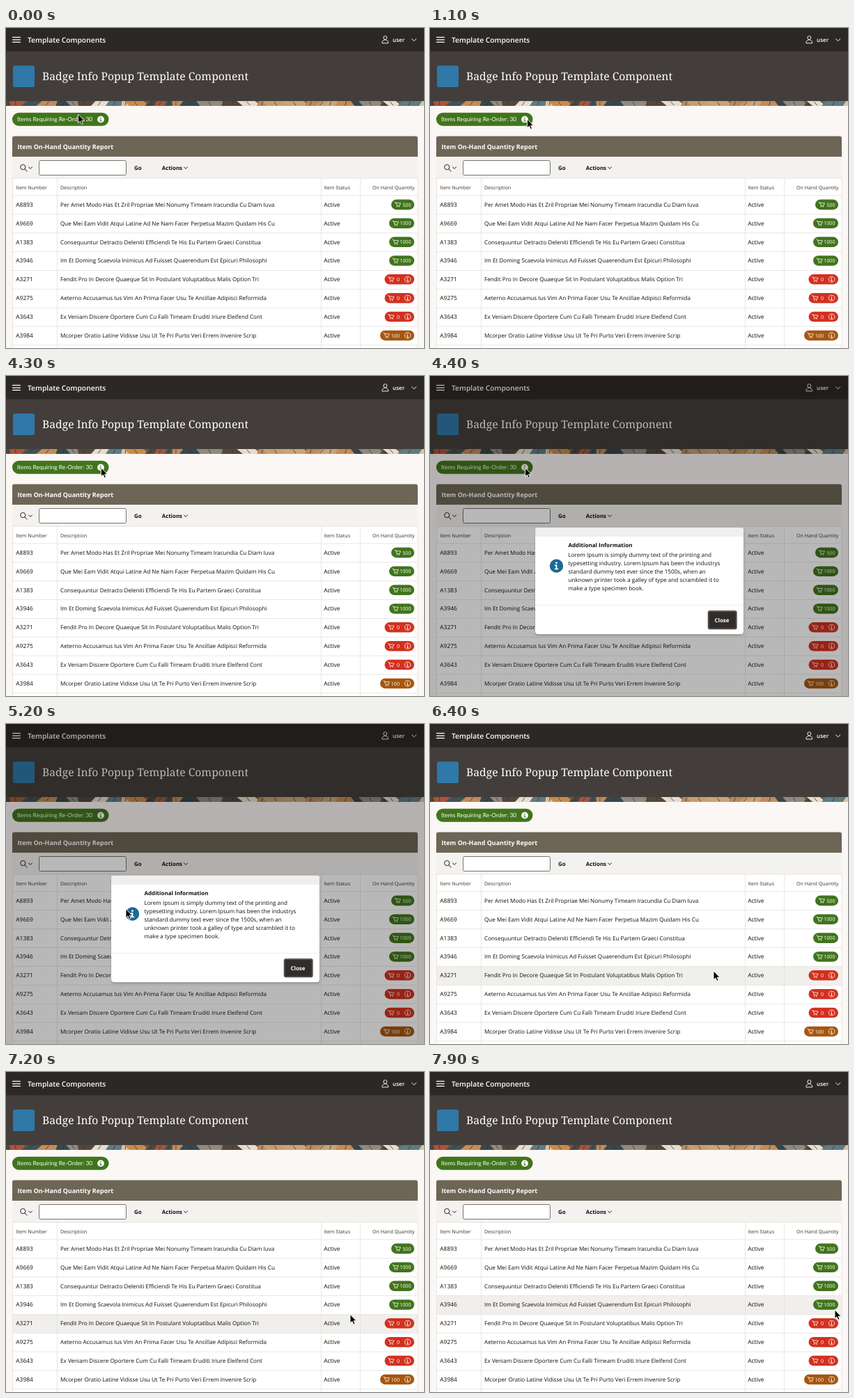
An HTML page for the animation above (8000 ms loop, 600 by 460 pixels).

```html
<!DOCTYPE html>
<html lang="en">
<head>
<meta charset="utf-8">
<title>Badge Info Popup</title>
<style>
  html, body { margin: 0; width: 600px; height: 460px; overflow: hidden; }
  svg { display: block; }
  text { font-family: "Open Sans", "Noto Sans", sans-serif; text-rendering: geometricPrecision; white-space: pre; }
  .title { font-family: "Noto Serif", serif; }
  .pill { font-family: Lato, sans-serif; }
</style>
</head>
<body>
<svg id="stage" width="600" height="460" viewBox="0 0 600 460"></svg>
<script>
const WHITE = '#fff', INK = '#100f0e', GREEN = '#41741c', RED = '#d2311f', AMBER = '#a6560e';
const ROW_TOP = 241, ROW_H = 26.87;

const rect = (x, y, w, h, fill, r = 0, extra = '') =>
  `<rect x="${x}" y="${y}" width="${w}" height="${h}" rx="${r}" fill="${fill}" ${extra}/>`;
const text = (x, y, s, fill = INK, size = 8.14, extra = '') =>
  `<text x="${x}" y="${y}" fill="${fill}" font-size="${size}" ${extra}>${s}</text>`;
const bold = (x, y, s, fill = INK, size = 7.9, weight = 700) =>
  text(x, y, s, fill, size, `font-weight="${weight}"`);
const line = (d, color, width = 1) =>
  `<path d="${d}" fill="none" stroke="${color}" stroke-width="${width}" stroke-linecap="round" stroke-linejoin="round"/>`;
const circle = (x, y, r, fill, extra = '') => `<circle cx="${x}" cy="${y}" r="${r}" fill="${fill}" ${extra}/>`;
const chevron = (x, y, w, color) => line(`M${x} ${y}l${w / 2} ${w / 2}l${w / 2} ${-w / 2}`, color, 0.95);

// Letter "i" drawn inside an info circle
const infoMark = (x, y, k, color) =>
  circle(x, y - 2.3 * k, 0.75 * k, color) +
  line(`M${x - 0.9 * k} ${y - 0.4 * k}h${0.9 * k}v${2.7 * k}m${-k} 0h${2 * k}`, color, 0.95 * k);

const cart = (x, y) =>
  line(`M${x} ${y - 3.4}h1.4l1.6 4.8h4l1.4 -3.6h-6.5`, WHITE, 0.75) +
  circle(x + 3.3, y + 3, 0.75, WHITE) + circle(x + 6.4, y + 3, 0.75, WHITE);

function quantity(y, value) {
  const warn = value <= 100;
  const color = value === 0 ? RED : warn ? AMBER : GREEN;
  const left = { 0: 543.5, 100: 537, 500: 553, 1000: 550 }[value];
  return rect(left, y - 7.3, 586 - left, 14.6, color, 7.3) + cart(left + 5, y) +
    text(warn ? 565 : 581.5, y + 2.7, value, WHITE, 7.2, 'text-anchor="end"') +
    (warn ? circle(576.5, y, 4.2, 'none', 'stroke="#fff" stroke-width=".8"') + infoMark(576.5, y, 0.9, WHITE) : '');
}

function bannerStrip() {
  const colors = ['#4b4843', '#5e7c84', '#8f8a80', '#3d5358', '#c98a4a', '#e6dccb', '#35484c', '#a9543a', '#d9c3a2', '#56473d', '#c58b55'];
  const rnd = i => Math.abs(Math.sin(i * 127.1 + 3) * 43758.5) % 1;
  let out = rect(0, 105, 600, 7, '#6a5c50');
  for (let x = -8, i = 0; x < 600; i++) {
    const w = 10 + rnd(i) * 22, slant = 10 - rnd(i + 50) * 20;
    const color = x > 345 && x < 470 ? ['#c9a379', '#b98a5c', '#c79d70'][i % 3] : colors[i * 7 % colors.length];
    out += `<path d="M${x} 112l${slant} -7h${w + 6}l${-slant} 7z" fill="${color}"/>`;
    out += line(`M${x + w / 2} 111l${slant / 2} -5`, '#2f3435', 0.8);
    x += w;
  }
  return out;
}

const rows = [
  ['A8893', 'Per Amet Modo Has Et Zril Propriae Mei Nonumy Timeam Iracundia Cu Diam Iuva', 500],
  ['A9669', 'Que Mei Eam Vidit Atqui Latine Ad Ne Nam Facer Perpetua Mazim Quidam His Cu', 1000],
  ['A1383', 'Consequuntur Detracto Deleniti Efficiendi Te His Eu Partem Graeci Constitua', 1000],
  ['A3946', 'Im Et Doming Scaevola Inimicus Ad Fuisset Quaerendum Est Epicuri Philosophi', 1000],
  ['A3271', 'Fendit Pro In Decore Quaeque Sit In Postulant Voluptatibus Malis Option Tri', 0],
  ['A9275', 'Aeterno Accusamus Ius Vim An Prima Facer Usu Te Ancillae Adipisci Reformida', 0],
  ['A3643', 'Ex Veniam Discere Oportere Cum Cu Falli Timeam Eruditi Iriure Eleifend Cont', 0],
  ['A3984', 'Mcorper Oratio Latine Vidisse Usu Ut Te Pri Purto Veri Errem Invenire Scrip', 100],
];

const header =
  rect(0, 0, 600, 34, '#2c2826') + rect(0, 33.5, 600, 72, '#433e3b') +
  line('M9.5 13.3h11M9.5 16.8h11M9.5 20.3h11', WHITE, 1.2) +
  bold(31, 20.5, 'Template Components', WHITE, 10.3, 600) +
  circle(544.3, 14, 2.5, 'none', 'stroke="#fff" stroke-width=".9"') + line('M539.8 21.4c0-6 9-6 9 0z', WHITE, 0.9) +
  bold(555, 20, 'user', WHITE, 8.1, 600) + chevron(582.5, 15.5, 6.4, WHITE) +
  rect(10, 54, 31, 31, '#2f78a8', 2) +
  text(52, 75.3, 'Badge Info Popup Template Component', WHITE, 15.7, 'class="title"') +
  bannerStrip();

const badge =
  rect(9, 121.8, 138.5, 19, GREEN, 9.5) +
  text(16, 134.4, 'Items Requiring Re-Order: 30', WHITE, 8.45, 'class="pill"') +
  circle(136, 131.4, 4.9, WHITE) + infoMark(136, 131.4, 1.05, GREEN);

const report =
  '<path d="M9 185v-26.5q0-3 3-3h576q3 0 3 3v26.5z" fill="#6d6656"/>' +
  bold(16.5, 173.7, 'Item On-Hand Quantity Report', WHITE, 8.95) +
  rect(9, 185, 582, 31, '#f4f2ef') +
  circle(24.3, 200, 3.6, 'none', `stroke="${INK}" stroke-width=".9"`) + line('M27 202.8l3.2 3.2', INK) + chevron(32.5, 199.8, 5, INK) +
  rect(47.5, 190.5, 125, 21, WHITE, 2, 'stroke="#77726d"') +
  bold(184, 203.8, 'Go') + bold(223.7, 203.8, 'Actions') + chevron(255.5, 199.8, 5, INK) +
  rect(9, 216, 582, 244, WHITE) +
  rect(9, ROW_TOP, 582, ROW_H, '#f1efec', 0, 'id="hover" visibility="hidden"') +
  [['Item Number', 14.3], ['Description', 78], ['Item Status', 456.3], ['On Hand Quantity', 526]]
    .map(([label, x]) => text(x, 232, label, '#3a3632', 7.15)).join('') +
  rows.map(([id, description, value], i) => {
    const y = ROW_TOP + ROW_H * (i + 0.5) - 0.6;
    return text(14.3, y + 3, id, INK, 8.4) + text(78, y + 3, description) +
      text(456.2, y + 3, 'Active', INK, 8.4) + quantity(y, value) +
      rect(9, ROW_TOP + ROW_H * i - 0.5, 582, 0.8, '#e4e1dd');
  }).join('') +
  rect(9, ROW_TOP + ROW_H * 8 - 0.5, 582, 0.8, '#e4e1dd') + rect(9, 215.6, 582, 0.8, '#e0ddd9') +
  [9, 73, 452, 508, 590.6].map(x => rect(x, 216, 0.8, 244, '#e4e1dd')).join('');

const message = [
  'Lorem Ipsum is simply dummy text of the printing and',
  'typesetting industry. Lorem Ipsum has been the industrys',
  'standard dummy text ever since the 1500s, when an',
  'unknown printer took a galley of type and scrambled it to',
  'make a type specimen book.',
];
const dialog = '<g id="dialog" visibility="hidden">' +
  rect(0, 0, 600, 460, '#000', 0, 'opacity=".28"') +
  rect(150, 219, 301, 155, '#000', 5, 'opacity=".12"') +
  rect(151, 218, 299, 153, WHITE, 4) +
  '<path d="M151 231v-9q0-4 4-4h291q4 0 4 4v9z" fill="#f0efee"/>' +
  rect(151, 329, 299, 0.8, '#eceae8') +
  bold(198.5, 245.5, 'Additional Information', INK, 8) +
  message.map((s, i) => text(198.5, 260 + i * 11.9, s)).join('') +
  circle(181.5, 273, 9.7, '#1b6a92') + infoMark(181.5, 273, 1.9, WHITE) +
  rect(398.8, 337.3, 41.8, 27, '#312d2a', 3) +
  rect(400, 338.5, 39.4, 24.6, 'none', 2, 'stroke="#8b8580" stroke-width=".6"') +
  bold(408.5, 353.8, 'Close', WHITE) + '</g>';

const pointer = '<path id="pointer" d="M0 0V12.6L2.9 9.9L4.9 14.4L7 13.5L5.1 9.2H9z" fill="#000" stroke="#fff" stroke-width=".9"/>';

const stage = document.getElementById('stage');
stage.innerHTML = rect(0, 0, 600, 460, '#faf7f5') + header + badge + report + dialog + pointer;
const [hoverEl, dialogEl, pointerEl] = ['hover', 'dialog', 'pointer'].map(id => document.getElementById(id));

// Pointer stops: time in ms, x, y
const stops = [
  [0, 103.5, 124], [800, 139.5, 131], [3600, 139.5, 131], [4100, 136.5, 132],
  [4600, 136.5, 132], [5200, 172, 266], [6100, 407, 355], [6600, 407, 355],
  [7800, 581, 342], [8000, 581, 342],
];
const OPEN = 4400, CLOSE = 6400;

function pointerAt(t) {
  const i = stops.findIndex(s => s[0] > t);
  const [t0, x0, y0] = stops[i - 1], [t1, x1, y1] = stops[i];
  const u = (t - t0) / (t1 - t0), k = u * u * (3 - 2 * u);
  return [x0 + (x1 - x0) * k, y0 + (y1 - y0) * k];
}

function draw(now) {
  const t = Math.floor(now % 8000 / 100) * 100;
  const [x, y] = pointerAt(t);
  const open = t >= OPEN && t < CLOSE;
  const row = Math.floor((y - ROW_TOP) / ROW_H);
  pointerEl.setAttribute('transform', `translate(${x} ${y})`);
  dialogEl.setAttribute('visibility', open ? 'visible' : 'hidden');
  hoverEl.setAttribute('visibility', !open && row >= 0 ? 'visible' : 'hidden');
  hoverEl.setAttribute('y', ROW_TOP + ROW_H * row);
  requestAnimationFrame(draw);
}
draw(performance.now());
</script>
</body>
</html>
```
